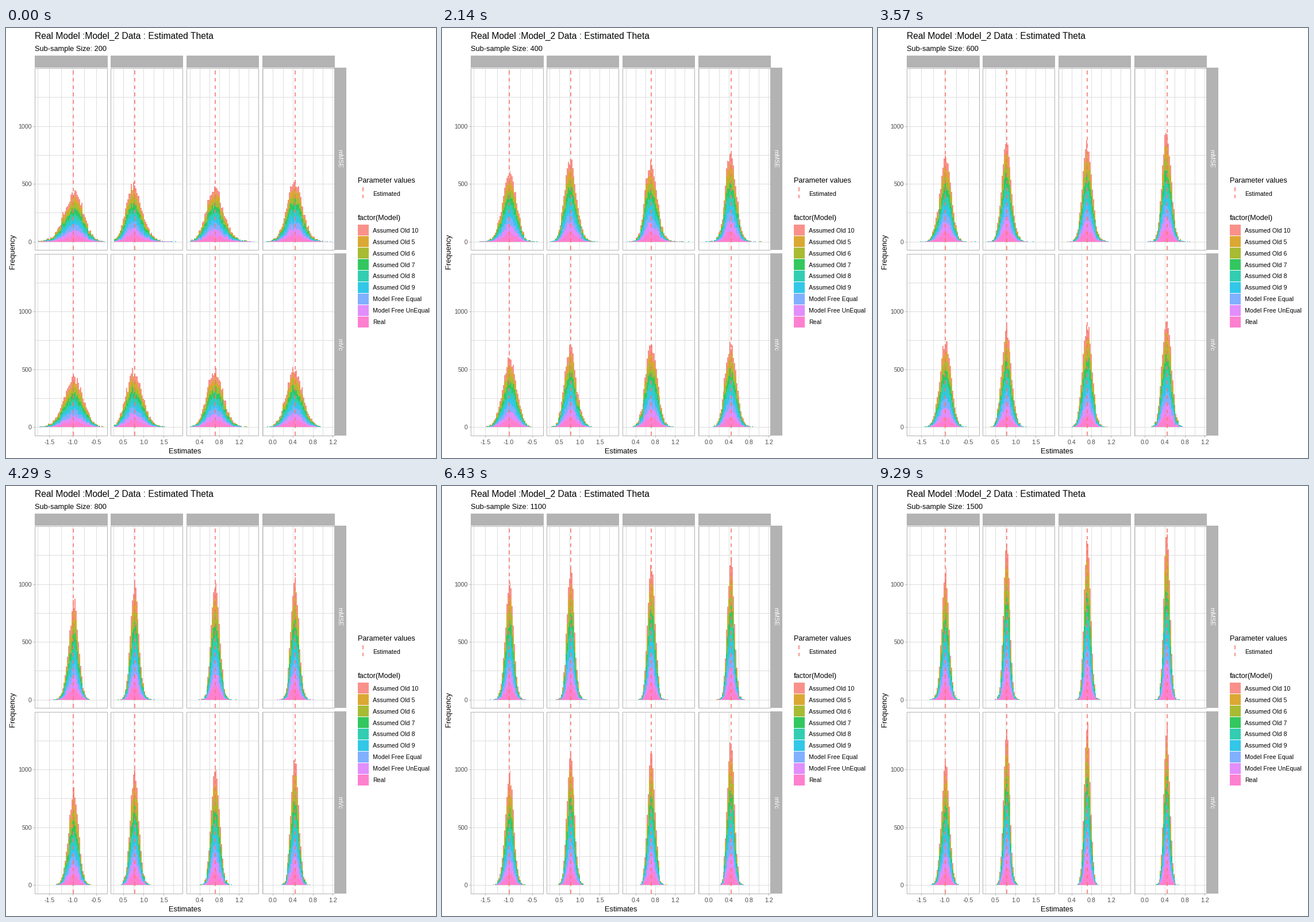
Animation, 748 px wide and 748 px high, one loop 10000 ms. Source, as a matplotlib script:

```python
import numpy as np
import matplotlib
import matplotlib.pyplot as plt
from matplotlib.animation import FuncAnimation
from matplotlib.patches import Polygon, Rectangle

SIZE, DPI = 748, 64
PT = 72 / DPI  # points per pixel
matplotlib.rcParams["font.family"] = "Liberation Sans"

GREY, GRID, INK, RED = "#B3B3B3", "#DEDEDE", "#4D4D4D", "#F8766D"
COLORS = ["#F8766D", "#D39200", "#93AA00", "#00BA38", "#00C19F",
          "#00B9E3", "#619CFF", "#DB72FB", "#FF61C3"]
MODELS = ["Assumed Old 10", "Assumed Old 5", "Assumed Old 6", "Assumed Old 7",
          "Assumed Old 8", "Assumed Old 9", "Model Free Equal",
          "Model Free UnEqual", "Real"]
SPREAD = [0.97, 0.98, 1.0, 1.06, 1.06, 1.06, 1.0, 0.96, 0.95]
RUNS = 1000
BIN = 1.93     # bin width in pixels
UNIT = 0.201   # pixels per count
DASH = 6.35

# left, right, zero position, pixels per unit, major ticks, minor step, true value, skew
COLS = [
    (50.5, 176.5, 197.6, 81.5, (-1.5, -1.0, -0.5), 0.25, 117.5, -0.04),
    (182.5, 307.5, 169.7, 69.6, (0.5, 1.0, 1.5), 0.25, 224.2, 0.05),
    (314.5, 439.5, 303.2, 85.0, (0.4, 0.8, 1.2), 0.2, 364.5, 0.04),
    (446.5, 571.5, 464.4, 86.5, (0.0, 0.4, 0.8, 1.2), 0.2, 502.7, 0.02),
]
# name, top, bottom, baseline
ROWS = [("mMSE", 69.5, 385.5, 371.5), ("mVc", 392.5, 708.5, 694.0)]

SIZES = np.arange(200, 1501, 100)
KNOTS = [200, 500, 700, 900, 1100, 1300, 1500]
PEAKS = [
    [[445, 685, 800, 940, 1015, 1085, 1135],
     [515, 790, 925, 1075, 1135, 1245, 1340],
     [480, 795, 950, 1060, 1165, 1245, 1375],
     [535, 855, 1010, 1105, 1235, 1405, 1428]],
    [[445, 665, 815, 870, 990, 1010, 1070],
     [510, 790, 950, 1040, 1140, 1245, 1350],
     [510, 795, 955, 1035, 1140, 1250, 1410],
     [515, 825, 995, 1160, 1235, 1340, 1410]],
]

fig = plt.figure(figsize=(SIZE / DPI, SIZE / DPI), dpi=DPI, facecolor="white")
ax = fig.add_axes([0, 0, 1, 1])
ax.set_xlim(0, SIZE)
ax.set_ylim(SIZE, 0)
ax.axis("off")


def text(x, y, s, px, color="black", ha="left", va="baseline", rot=0):
    return ax.text(x, y, s, fontsize=px * PT, color=color, ha=ha, va=va, rotation=rot)


def line(xs, ys, color, width=1.0, z=1, **kw):
    ax.plot(xs, ys, color=color, lw=width * PT, zorder=z, solid_capstyle="butt", **kw)


def rect(x0, y0, x1, y1, z=1, **kw):
    ax.add_patch(Rectangle((x0, y0), x1 - x0, y1 - y0, zorder=z, **kw))


def dashed(x, y0, y1):
    while y0 > y1:
        line([x, x], [y0, max(y0 - DASH, y1)], RED, 1.6, 3)
        y0 -= 2 * DASH


def bin_edges(col):
    left, right, zero = col[:3]
    first = np.ceil((left + 5.7 - zero) / BIN)
    last = np.floor((right - 5.7 - zero) / BIN)
    return zero + (np.arange(first, last + 2) - 0.5) * BIN


def counts(row, c, n):
    """Stacked histogram counts, one row per model."""
    rng = np.random.default_rng(1000 * row + 100000 * c + int(n))
    col = COLS[c]
    peak = np.interp(np.sqrt(n), np.sqrt(KNOTS), PEAKS[row][c])
    sd = len(MODELS) * RUNS * BIN / (2.507 * peak * 0.96)
    skew = col[7] * np.sqrt(200 / n) * (1 - 0.3 * row)
    df = (10 if row == 0 else 30) + n / 25
    out = []
    for spread in SPREAD:
        z = rng.standard_t(df, RUNS)
        x = col[6] - 0.2 + sd * spread * (z + skew * (z * z - 1))
        out.append(np.histogram(x, EDGES[c])[0])
    out = np.array(out, float)
    return out * peak / out.sum(axis=0).max()


def draw_panel(row, c):
    name, top, bottom, base = ROWS[row]
    left, right, zero, scale, majors, step, true, _ = COLS[c]
    for k in range(6):
        y = base - 250 * k * UNIT
        line([left, right], [y, y], GRID)
    for k in range(-12, 13):
        x = zero + k * step * scale
        if left < x < right:
            line([x, x], [top, bottom], GRID)
    dashed(true, bottom, top)
    rect(left, top, right, bottom, 4, fill=False, ec=GREY, lw=PT)
    layers = []
    for color in COLORS:
        p = Polygon([[left, base]] * 3, closed=True, fc=color, ec="none",
                    alpha=0.8, antialiased=False, zorder=2)
        ax.add_patch(p)
        layers.append(p)
    return layers


EDGES = [bin_edges(col) for col in COLS]
bars = {(r, c): draw_panel(r, c) for r in range(2) for c in range(4)}
data = {(r, c, i): counts(r, c, n)
        for r, c in bars for i, n in enumerate(SIZES)}

# strips, ticks and axis labels
for c, (left, right, zero, scale, majors, *_) in enumerate(COLS):
    rect(left - 0.5, 48, right + 0.5, 69, 4, fc=GREY, ec="none")
    text((left + right) / 2, 63, f"Theta{c}", 10.7, "white", "center")
    for v in majors:
        x = zero + v * scale
        line([x, x], [709, 712], GREY)
        text(x, 723.5, f"{v:.1f}", 10.6, INK, "center")
for name, top, bottom, base in ROWS:
    rect(571.5, top - 0.5, 592, bottom + 0.5, 5, fc=GREY, ec="none")
    t = text(580, (top + bottom) / 2, name, 10.7, "white", "center", "center", 270)
    t.set_zorder(6)
    for v in (0, 500, 1000):
        y = base - v * UNIT
        line([47, 50], [y, y], GREY)
        text(45, y + 4, str(v), 10.6, INK, "right")

text(50, 19, "Real Model :Model_2 Data : Estimated Theta", 15.6)
subtitle = text(50, 40, "", 12.8)
text(311, 740, "Estimates", 12.9, ha="center")
text(12.5, 388.5, "Frequency", 12.9, ha="center", va="center", rot=90)

# legends
text(612, 269, "Parameter values", 12.8)
dashed(621.5, 296.3, 276)
text(638, 292, "Estimated", 10.6)
text(612, 334, "factor(Model)", 12.7)
for i, (name, color) in enumerate(zip(MODELS, COLORS)):
    y = 351.8 + 19.9 * i
    rect(612, y - 9.5, 631, y + 9.5, fc=color, ec="none", alpha=0.8)
    text(638, y + 4, name, 10.6)


def outline(x, upper, lower):
    xs = np.repeat(x, 2)[1:-1]
    up, low = np.repeat(upper, 2), np.repeat(lower, 2)
    return np.column_stack([np.r_[xs, xs[::-1]], np.r_[up, low[::-1]]])


def update(i):
    subtitle.set_text(f"Sub-sample Size: {SIZES[i]}")
    for (r, c), layers in bars.items():
        low = np.full(len(EDGES[c]) - 1, ROWS[r][3])
        for layer, h in zip(layers[::-1], data[r, c, i][::-1]):
            up = low - h * UNIT
            layer.set_xy(outline(EDGES[c], up, low))
            low = up
    return [subtitle]


anim = FuncAnimation(fig, update, frames=len(SIZES), interval=10000 / len(SIZES),
                     repeat=True, repeat_delay=0, blit=False)
plt.show()
```
